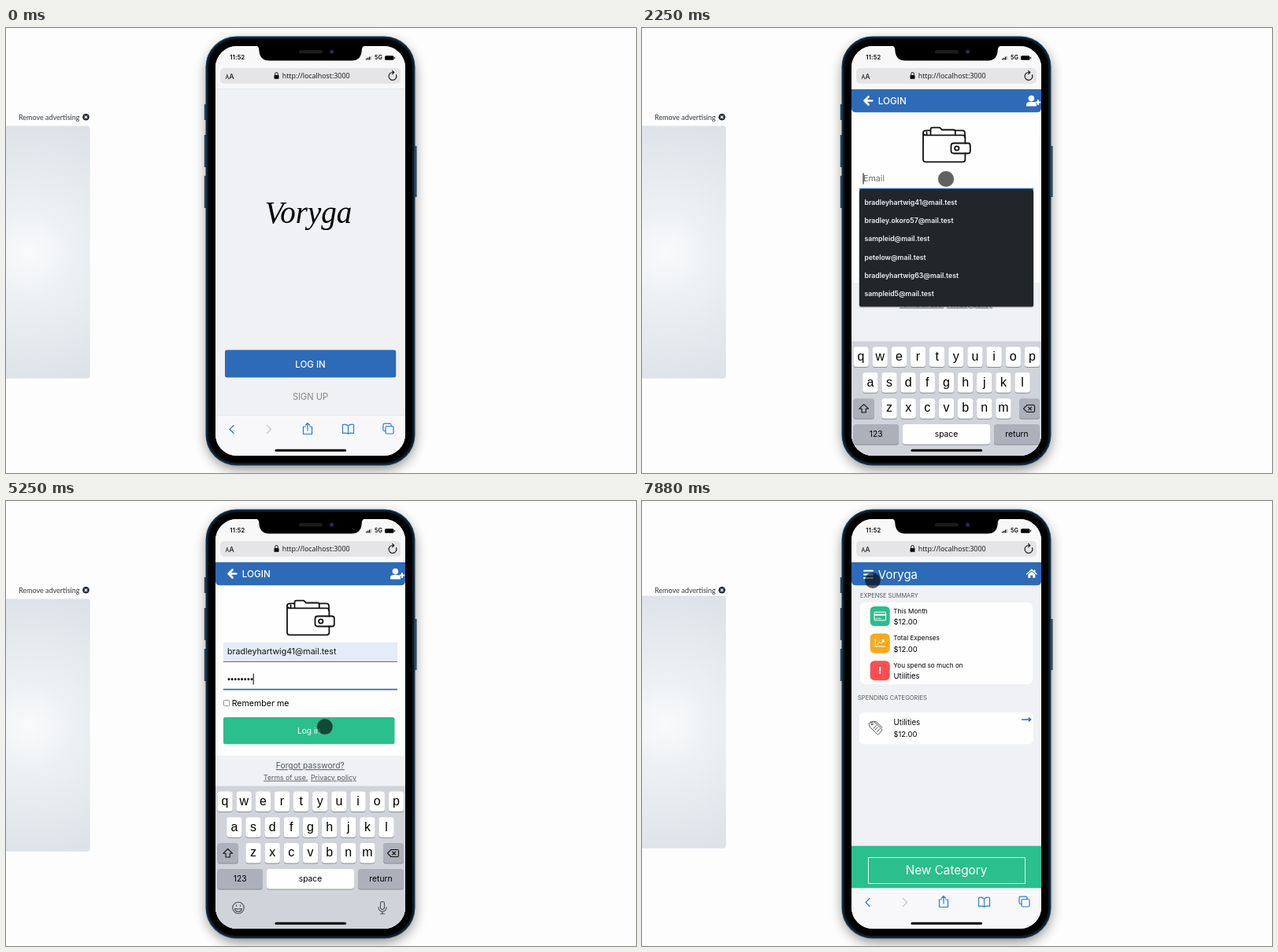
These frames come from a looping animation (800 px wide and 566 px high, 8 s). An HTML page:

```html
<!DOCTYPE html>
<html lang="en">
<head>
<meta charset="utf-8">
<title>Budget app login</title>
<style>
html, body { margin: 0; height: 100%; overflow: hidden; background: #fdfdfe; }
svg { display: block; width: 800px; height: 566px; font-family: Inter, sans-serif; }
.mid { text-anchor: middle; }
.line { fill: none; stroke-linecap: round; stroke-linejoin: round; }
.open { font-family: "Open Sans", sans-serif; }
.key { font: 16px "Liberation Sans", Arial, sans-serif; text-anchor: middle; }
.cap { font: 10.3px Inter, sans-serif; }
</style>
</head>
<body>
<svg viewBox="0 0 800 566">
  <defs>
    <radialGradient id="glow" gradientUnits="userSpaceOnUse" cx="30" cy="287" r="180">
      <stop offset="0" stop-color="#f9fafb"/><stop offset=".3" stop-color="#eef1f4"/>
      <stop offset="1" stop-color="#dbe1e7"/>
    </radialGradient>
    <clipPath id="screen"><rect x="266" y="23" width="241" height="521" rx="27"/></clipPath>
    <filter id="soft" x="-30%" y="-30%" width="160%" height="160%"><feGaussianBlur stdDeviation="8"/></filter>
  </defs>

  <!-- advert -->
  <text x="16" y="116.8" font-size="9" fill="#34383f" style="font-family:Lato,sans-serif">Remove advertising</text>
  <circle cx="101.5" cy="113.3" r="4.3" fill="#1f2733"/>
  <path d="M99.8 111.6l3.4 3.4m0-3.4l-3.4 3.4" stroke="#fff" stroke-width="1.1"/>
  <rect id="ad" x="-20" y="124.5" width="126.7" height="321.2" rx="4" fill="url(#glow)"/>

  <!-- phone body -->
  <rect x="255" y="17" width="264" height="544" rx="40" opacity=".45" filter="url(#soft)"/>
  <path d="M252.9 97v20m0 19v41m0 11v41M520.4 150v65" stroke="#2b4356" stroke-width="2.2"/>
  <rect x="253.5" y="10.5" width="266" height="546" rx="39" fill="#1c3a52"/>
  <rect x="254.8" y="11.8" width="263.4" height="543.4" rx="38" fill="#0c1b28"/>
  <rect x="257" y="14" width="259" height="539" rx="36"/>

  <g clip-path="url(#screen)">
    <rect x="266" y="23" width="241" height="521" fill="#eff1f4"/>

    <g id="start">
      <text class="mid" x="384" y="248" font-size="39" font-style="italic" style="font-family:'Liberation Serif','Times New Roman',serif">Voryga</text>
      <rect x="278" y="409.6" width="217.2" height="34.8" rx="2.5" fill="#2d6ab8"/>
      <text class="mid" x="386.5" y="432.4" font-size="11.5" font-weight="500" fill="#fff">LOG IN</text>
      <text class="mid" x="386.5" y="472.5" font-size="11.1" fill="#85888b">SIGN UP</text>
    </g>

    <g id="login">
      <g id="below">
        <rect x="266" y="100" width="241" height="223.3" fill="#fefefe"/>
        <rect x="276.5" y="252.7" width="7.2" height="7.2" rx="1.2" fill="#fff" stroke="#777" stroke-width=".8"/>
        <text x="286.7" y="260.4" font-size="10.6">Remember me</text>
        <rect id="submit" x="276" y="274.3" width="217.5" height="34.3" rx="2.5"/>
        <text id="submitText" class="mid" x="384.7" y="295.8" font-size="10.2" fill="#fff">Log in</text>
        <g fill="#55585b" text-decoration="underline">
          <text x="342.8" y="339.5" font-size="10.3">Forgot password?</text>
          <text x="327" y="354" font-size="8.7">Terms of use.</text>
          <text x="387" y="354" font-size="8.8">Privacy policy</text>
        </g>
      </g>
      <path d="M266 78h241v24q0 5.3-6 5.3h-229q-6 0-6-5.3z" fill="#2d6ab8"/>
      <path class="line" d="M292.3 92.5h-9.5m4.800-5l-5 5l5 5" stroke="#fff" stroke-width="2.7"/>
      <text x="299.8" y="96.9" font-size="11.7" font-weight="500" fill="#fff">LOGIN</text>
      <g fill="#fff">
        <circle cx="494.4" cy="89.6" r="3.8"/>
        <path d="M488 99.5v-2q0-3.5 4-3.5h5q4 0 4 3.5v2z"/>
        <path d="M499.6 94.6h6.600m-3.300-3.300v6.600" stroke="#fff" stroke-width="2"/>
      </g>
      <!-- wallet -->
      <g class="line" stroke="#111" stroke-width="1.8">
        <path d="M357 133v34q0 3.4 3.4 3.4h46.600q3.400 0 3.400-3.400v-7.500M357 133q0 3.300 3.300 3.300h46.800q3.300 0 3.300 3.300v7"/>
        <path d="M357 133q0-2.600 4-2.600h5M361.500 136v-3.500M398 130.400h9q3 0 3 3v6"/>
        <path d="M366.500 136v-7q0-2.300 2.300-2.300h9.200l3 2.800h14.500q2.300 0 2.300 2.300v4"/>
        <path d="M396 146.500h18q2.800 0 2.800 2.800v7.400q0 2.800-2.800 2.800h-18q-3.500 0-3.500-3.500v-6q0-3.500 3.500-3.500z"/>
        <circle cx="399.8" cy="153" r="2.7"/>
      </g>
      <rect id="filled" x="276" y="179.7" width="221" height="24.5" fill="#e4ecf7"/>
      <text id="email" x="281" y="195.2"/>
      <rect id="emailLine" x="276" width="221"/>
      <text id="passHint" x="281" y="230.2" font-size="10.3" fill="#66696c">Password</text>
      <g id="dots"></g>
      <rect id="passLine" x="276" width="221"/>
      <rect id="caret" width="1" height="14"/>
      <g id="menu">
        <rect x="275" y="207" width="223" height="149" rx="3" opacity=".15"/>
        <rect x="276" y="205" width="221" height="149.5" rx="2" fill="#232629"/>
      </g>
    </g>

    <g id="home">
      <path d="M266 78h241v24q0 5.3-6 5.3h-229q-6 0-6-5.3z" fill="#2d6ab8"/>
      <path class="line" d="M282 88.7h11m-11 4.700h11m-11 4.700h11" stroke="#fff" stroke-width="2"/>
      <text x="299.8" y="98.7" font-size="15" fill="#fff">Voryga</text>
      <path d="M488.5 93l6.300-5.600l6.300 5.600M498.700 88v2" class="line" stroke="#fff" stroke-width="1.5"/>
      <path d="M490.3 93.500l4.500-4l4.500 4v4.300h-3v-3.300h-3v3.300h-3z" fill="#fff"/>
      <g fill="#55595e">
        <text x="277" y="122.7" font-size="7.4">EXPENSE SUMMARY</text>
        <text x="274" y="252.5" font-size="7.55">SPENDING CATEGORIES</text>
      </g>
      <rect x="277" y="129" width="219" height="104" rx="6" fill="#fefefe"/>
      <g id="summary"></g>
      <g class="line" stroke="#fff" stroke-width="1.1">
        <rect x="295" y="141.3" width="14.5" height="10.5" rx="1.3"/>
        <path d="M295 144.7h14.5" stroke-width="2"/><path d="M297 149.3h1.5m1.5 0h3"/>
        <path d="M296.3 176v9h12M298.5 182.5l3-3.2l2 1.800l3.500-4m-2.200-.2h2.400v2.300"/>
        <path d="M302.2 211.700v4.200m0 2.700v.2" stroke-width="2"/>
      </g>
      <rect x="276" y="268.7" width="221" height="40.5" rx="6" fill="#fefefe"/>
      <g class="line" stroke="#555">
        <path d="M288.5 282.5l6-2l10 9.500q1 1 0 2l-4 4.500q-1 1-2 0l-9-9z"/>
        <path d="M290 281l7-.5l8 7.500M294 289.500l3.500-4m1 8l3.500-4m-6 1.500l3-3"/>
        <circle cx="292" cy="284" r="1"/>
      </g>
      <text x="319.5" y="284.9" font-size="9.7">Utilities</text>
      <text x="319.5" y="299.5" font-size="9.4">$12.00</text>
      <path class="line" d="M482.7 278h11m-2.300-2l2.300 2l-2.300 2" stroke="#2d6ab8" stroke-width="1.6"/>
      <rect x="266" y="438.7" width="241" height="54" fill="#2abf8d"/>
      <rect x="287.5" y="453.5" width="199" height="33" fill="none" stroke="#d8f5ea"/>
      <text class="mid" x="386.5" y="475.3" font-size="15.3" fill="#fff">New Category</text>
    </g>

    <!-- browser bars -->
    <rect x="266" y="23" width="241" height="54.5" fill="#f8f8f9"/>
    <path d="M266 77.5h241" stroke="#dcdde0" stroke-width=".6"/>
    <text x="284.3" y="39.5" font-size="7.5" font-weight="600" letter-spacing=".25">11:52</text>
    <path d="M457.7 40.5v-1.800m2 1.800v-2.700m2 2.700v-4" stroke="#111" stroke-width="1.4"/>
    <path d="M463.7 40.5v-5" stroke="#bbb" stroke-width="1.2"/>
    <text x="468" y="40.3" font-size="7.2" font-weight="600">5G</text>
    <rect x="481" y="35.2" width="11.5" height="5.6" rx="1.6"/><rect x="493.2" y="37" width="1" height="2" rx=".5"/>
    <rect x="272" y="51" width="229" height="19.7" rx="5" fill="#e5e5e8"/>
    <text x="278.5" y="64.5" font-size="7">A</text><text x="283.2" y="64.5" font-size="9.4">A</text>
    <rect x="340.5" y="60" width="6" height="4.8" rx=".8"/>
    <path d="M341.7 60v-1.700a1.800 1.800 0 0 1 3.600 0v1.700" class="line" stroke="#111"/>
    <text class="open" x="350.7" y="64" font-size="8.9" fill="#111">http://localhost:3000</text>
    <path class="line" d="M495.5 59.500a4.900 4.900 0 1 1-4.500-3h1.500m-1.900-2.200l2.100 2.200l-2.100 2.200" stroke="#111" stroke-width="1.1"/>
    <rect x="266" y="492.5" width="241" height="52" fill="#f8f8fa"/>
    <path d="M266 492.5h241" stroke="#dfe0e3" stroke-width=".6"/>
    <g class="line" stroke="#2b7ad8" stroke-width="1.2">
      <path d="M289 505.500l-5 5l5 5"/>
      <path d="M331.5 505.500l5 5l-5 5" stroke="#c4c5c9"/>
      <path d="M380.5 507h-3v9.500h11v-9.500h-3m-2.500 5v-9.500m-2.500 2.500l2.500-2.500l2.500 2.500"/>
      <path d="M434.5 506q-3-2.500-7-1.500v11q4-1 7 .7q3-1.700 7-.7v-11q-4-1-7 1.500v10"/>
      <rect x="482" y="506.5" width="10" height="9.5" rx="1.5"/><path d="M482 512.500h-1.500q-1.500 0-1.500-1.500v-6.300q0-1.500 1.500-1.500h7q1.500 0 1.500 1.500v1.500"/>
    </g>

    <g id="keyboard"><rect x="266" y="362.5" width="241" height="200" fill="#d0d3da"/></g>
    <rect x="341.5" y="535.7" width="90.5" height="3" rx="1.5"/>
    <circle id="pointer" r="10" fill-opacity=".62" stroke="#666" stroke-opacity=".35" stroke-width=".7"/>
  </g>

  <!-- notch -->
  <path d="M316 22.500q5 0 5.300 5q.5 14 13 14h104.500q12.500 0 13-14q.3-5 5.300-5z"/>
  <rect x="372" y="28" width="30" height="4.5" rx="2.2" fill="#1b1b1d"/>
  <circle cx="413.5" cy="30.3" r="3" fill="#0b1c33"/><circle cx="413.7" cy="30.3" r="1.3" fill="#1d4a78"/>
</svg>
<script>
const $ = id => document.getElementById(id);
const add = (id, html) => $(id).insertAdjacentHTML('beforeend', html);
const set = (id, attrs) => { for (const k in attrs) $(id).setAttribute(k, attrs[k]); };
const show = (id, on) => { $(id).style.display = on ? '' : 'none'; };

const mails = ['bradleyhartwig41', 'bradley.okoro57', 'sampleid', 'petelow', 'bradleyhartwig63', 'sampleid5']
  .map(name => name + '@mail.test');
mails.forEach((mail, i) => add('menu',
  `<text x="282.5" y="${225.2 + i * 23.1}" font-size="8.7" font-weight="600" fill="#f1f1f2">${mail}</text>`));

[['This Month', '$12.00', '#2abd8c'], ['Total Expenses', '$12.00', '#f8a91f'], ['You spend so much on', 'Utilities', '#fb4f53']]
  .forEach(([label, value, color], i) => {
    const y = 134 + i * 34.6;
    add('summary', `<rect x="289.7" y="${y}" width="25" height="25" rx="5.5" fill="${color}"/>
      <text x="319.3" y="${y + 8.7}" font-size="8.2">${label}</text>
      <text x="319.5" y="${y + 23.2}" font-size="9.5">${value}</text>`);
  });

for (let i = 0; i < 8; i++) add('dots', `<circle cx="${283 + i * 4.15}" cy="226.7" r="1.45"/>`);

function key(x, row, w, label, fill = '#fff', cls = '') {
  const y = 369.5 + row * 32.8;
  add('keyboard', `<rect x="${x}" y="${y + 1}" width="${w}" height="25.5" rx="3.5" fill="#8b8e96"/>
    <rect x="${x}" y="${y}" width="${w}" height="25.5" rx="3.5" fill="${fill}"/>
    <text class="key ${cls}" x="${x + w / 2}" y="${y + (cls ? 15.6 : 17.3)}">${label}</text>`);
}
[['qwertyuiop', 268.4], ['asdfghjkl', 280.2], ['zxcvbnm', 304.4]].forEach(([row, x], r) =>
  [...row].forEach((c, i) => key(x + i * 24.15, r, 19.3, c)));
const grey = '#adb0bb';
key(268.5, 2, 26.5, '', grey);
key(479, 2, 26, '', grey);
key(268.5, 3, 57.5, '123', grey, 'cap');
key(331, 3, 111, 'space', '#fff', 'cap');
key(447, 3, 58, 'return', grey, 'cap');
add('keyboard', `<g class="line" stroke="#111" stroke-width="1.1">
  <path d="M281.7 442.500l5.800 5.700h-3.200v4.800h-5.200v-4.800h-3.200z"/>
  <path d="M489 443.500h8q1.500 0 1.500 1.500v6q0 1.500-1.500 1.500h-8l-4.500-4.500zm1.700 2.500l4 4m0-4l-4 4"/>
  <g stroke="#4d5057"><circle cx="295" cy="517.5" r="7.2"/><path d="M290.5 518.500q4.500 1 9 0q-1 4-4.500 4t-4.500-4zM292.500 514v1.500m5-1.500v1.500"/>
  <rect x="475.5" y="509.5" width="5" height="10" rx="2.5"/><path d="M473 516.500q0 5.500 5 5.500t5-5.500m-5 5.500v3m-2.500 0h5"/></g></g>`);

// time, x, y
const path = [[125, 430, 535], [500, 385, 465], [875, 364, 426], [1250, 364, 426], [1500, 364, 422],
  [2000, 386, 192], [2375, 386, 192], [2875, 372, 221], [3250, 372, 221], [3750, 404, 228], [4875, 404, 228],
  [5375, 405, 298], [6375, 405, 298], [6875, 383, 330], [7250, 303, 101], [7500, 293, 101], [8000, 293, 101]];

function pointerAt(t) {
  const i = Math.max(1, path.findIndex(p => p[0] >= t));
  const [a, b] = [path[i - 1], path[i]];
  const u = Math.max(0, (t - a[0]) / (b[0] - a[0])), e = u * u * (3 - 2 * u);
  return { cx: a[1] + (b[1] - a[1]) * e, cy: a[2] + (b[2] - a[2]) * e };
}

function keyboardOffset(t) {
  if (t < 2125 || t >= 5750) return 200;
  if (t >= 5625) return 110;
  return t < 2500 ? 110 * Math.exp(-(t - 2125) / 112) : 0;
}

function underline(id, y, focused) {
  set(id, { y: y - (focused ? .2 : 0), height: focused ? 1.7 : .9, fill: focused ? '#2d6ab8' : '#55585b' });
}

function draw(t) {
  show('start', t < 1250);
  show('login', t >= 1250 && t < 6250);
  show('home', t >= 6250);

  const onEmail = t >= 2125 && t < 3875, onPass = t >= 3875 && t < 5625;
  const filled = t >= 3125, typed = Math.max(0, Math.min(8, Math.floor((t - 4125) / 125)));
  show('filled', filled);
  $('email').textContent = filled ? mails[0] : 'Email';
  set('email', { 'font-size': filled ? 10.6 : 10.7, fill: filled ? '#111' : '#66696c' });
  underline('emailLine', 203.9, onEmail);
  underline('passLine', 239, onPass);
  show('menu', t >= 2250 && !filled);
  show('passHint', !typed);
  [...$('dots').children].forEach((dot, i) => { dot.style.display = i < typed ? '' : 'none'; });
  show('caret', onEmail && !filled || onPass);
  set('caret', { x: 280.5 + typed * 4.15, y: onEmail ? 184.5 : 219.5 });
  set('below', { transform: `translate(0 ${onEmail || onPass ? .7 : 0})` });
  set('submit', { fill: t >= 5625 ? '#e9eced' : '#2abf8d' });
  show('submitText', t < 5625);

  set('keyboard', { transform: `translate(0 ${keyboardOffset(t)})` });
  show('pointer', t >= 125);
  set('pointer', pointerAt(t));
  set('ad', { transform: `translate(0 ${t >= 7750 ? -4 : t >= 7625 ? -2 : 0})` });
}

function tick() {
  draw(Math.floor((performance.now() % 8000) / 125) * 125);
  requestAnimationFrame(tick);
}
tick();
</script>
</body>
</html>
```
